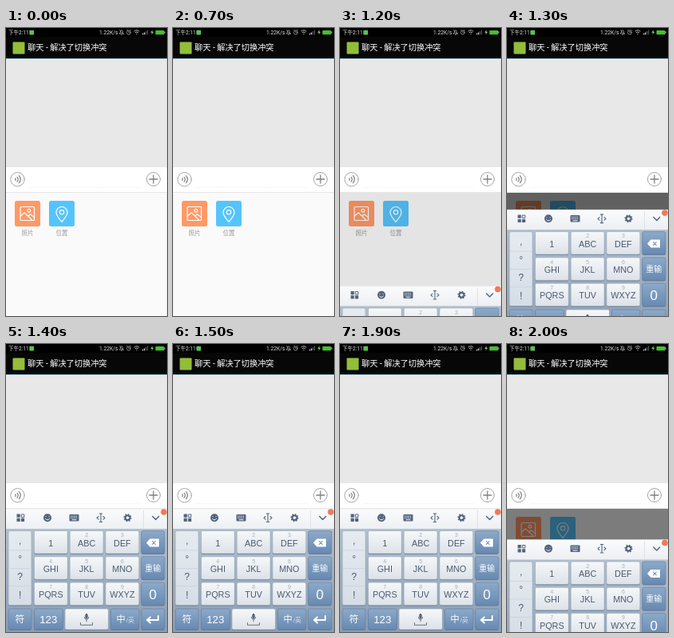
These frames come from a looping animation (202 px wide and 360 px high, 2100 ms). An HTML page:

```html
<!DOCTYPE html>
<html lang="zh">
<head>
<meta charset="utf-8">
<title>Chat keyboard switch</title>
<style>
html, body { margin: 0; width: 100%; height: 100%; overflow: hidden; background: #000; }
svg { display: block; width: 100%; height: 100%; }
text { font-family: "Liberation Sans", "Noto Sans CJK SC", "Noto Sans CJK", sans-serif; }
.bar { font-family: Roboto, "Noto Sans CJK SC", "Noto Sans CJK", sans-serif; }
.mid { text-anchor: middle; }
.line { fill: none; stroke-linecap: round; stroke-linejoin: round; }
</style>
</head>
<body>
<svg viewBox="0 0 202 360">
  <defs>
    <linearGradient id="light" x2="0" y2="1"><stop stop-color="#f6f8f9"/><stop offset="1" stop-color="#dce2e9"/></linearGradient>
    <linearGradient id="side" x2="0" y2="1"><stop stop-color="#e6ebf0"/><stop offset="1" stop-color="#d5dde6"/></linearGradient>
    <linearGradient id="blue" x2="0" y2="1"><stop stop-color="#8caac9"/><stop offset="1" stop-color="#6789b1"/></linearGradient>
    <linearGradient id="board" x2="0" y2="1"><stop stop-color="#b3c0ce"/><stop offset="1" stop-color="#8b9db4"/></linearGradient>
    <linearGradient id="tools" x2="0" y2="1"><stop stop-color="#fafbfc"/><stop offset="1" stop-color="#eceff3"/></linearGradient>
  </defs>

  <rect width="202" height="360" fill="#fafafa"/>
  <rect width="202" height="38" fill="#000"/>
  <rect y="11" width="202" height="27" fill="#070707"/>
  <rect y="38" width="202" height="136" fill="#e8e8e8"/>
  <rect y="38" width="202" height="1" fill="#a5d3e2"/>

  <!-- status bar -->
  <g fill="#ddd">
    <text class="bar" x="3" y="8" font-size="6.5">下午2:11</text>
    <text class="bar" x="117" y="8" font-size="6.7">1.22K/s</text>
    <rect x="29.3" y="2.8" width="5.8" height="5.8" rx="1" fill="#5cbf55"/>
    <g class="line" stroke="#bbb" stroke-width=".7">
      <path d="M142.500 7h5l-.9-1.400V4.500a1.600 1.600 0 0 0-3.200 0v1.100zM144.400 8.200h1.200M142.500 2.500l5 5.600"/>
      <circle cx="154" cy="5.600" r="2.500"/>
      <path d="M154 4.200v1.500h1M151.500 3l1-1M156.500 3l-1-1"/>
      <path d="M161 4a4.400 4.400 0 0 1 6 0M162.200 5.600a2.700 2.700 0 0 1 3.600 0M163.800 7.500h.4" stroke-width="1"/>
    </g>
    <path d="M171 8.300v-1.500h1.200v1.500zM173 8.300V5.400h1.200v2.900z"/>
    <path d="M175 8.300V4h1.200v4.300zM177 8.300V2.500h1.200v5.800z" fill="#555"/>
    <path d="M184 2.300l-2.800 3.500h2l-.8 2.700 3-3.700h-2z" fill="#8fd07c"/>
    <rect x="187.500" y="3" width="11" height="5.200" rx=".8" fill="#47bd35"/>
    <path d="M198.500 4.600h1v2h-1z"/>
  </g>

  <!-- title bar -->
  <rect x="8.500" y="17.500" width="15" height="15" rx="1" fill="#94bd3a"/>
  <text class="bar" x="27" y="28.300" font-size="10.200" fill="#fff">聊天 - 解决了切换冲突</text>

  <!-- input bar -->
  <rect y="174" width="202" height="31" fill="#fff"/>
  <path d="M0 205.500H202" stroke="#e6e6e6"/>
  <path d="M29 199.500H169" stroke="#ececec" stroke-width=".8" stroke-dasharray="1 1"/>
  <g class="line" stroke="#808080">
    <circle cx="14.500" cy="189.200" r="8.700" stroke="#a5a5a5"/>
    <path d="M11.700 188q1 1.200 0 2.400M14 186.400q2.400 2.800 0 5.600M16.300 184.700q4 4.500 0 9" stroke-width="1.200"/>
    <circle cx="185" cy="189" r="8.500" stroke="#a5a5a5"/>
    <path d="M180 189h10M185 184v10" stroke-width="1.300"/>
  </g>

  <!-- attachment panel -->
  <rect x="11" y="216" width="32" height="32" rx="2.500" fill="#ff9966"/>
  <rect x="54" y="216" width="32" height="32" rx="2.500" fill="#55c4fc"/>
  <g class="line" stroke="#fff" stroke-width="1.200">
    <rect x="18" y="223.500" width="17.500" height="17" rx="1"/>
    <circle cx="28.800" cy="228.300" r="1.900"/>
    <path d="M18.500 235l4.500-4.200 9.500 9M27.500 235l3-2.200 4.800 3.800"/>
    <path d="M70 242.500c-3-4.500-7-7.500-7-12a7 7 0 0 1 14 0c0 4.500-4 7.500-7 12z"/>
    <circle cx="70" cy="230.300" r="2.700"/>
  </g>
  <g class="mid" font-size="7.600" fill="#999">
    <text x="27" y="258.600">照片</text>
    <text x="70" y="258.600">位置</text>
  </g>

  <rect id="dim" y="206" width="202" height="154"/>

  <g id="keyboard">
    <rect y="206" width="202" height="26" fill="url(#tools)"/>
    <path d="M0 206.200H202" stroke="#dfe3e8" stroke-width=".5"/>
    <rect y="231" width="202" height="129" fill="url(#board)"/>
    <path d="M172.500 208V230" stroke="#d3d9e1" stroke-width=".7"/>
    <g fill="#52647d">
      <path d="M13.500 212.500h4.200v4.200h-4.200zM13.500 217.800h4.200v4.200h-4.200zM18.900 217.800h4.200v4.200h-4.200z"/>
      <path d="M19.200 213h3.600v3.400h-3.600z" fill="none" stroke="#52647d"/>
      <circle cx="52" cy="217.200" r="5"/>
      <rect x="79.500" y="213" width="12" height="8.500" rx="1"/>
      <circle cx="152.500" cy="217.200" r="4"/>
    </g>
    <g class="line" stroke="#52647d" stroke-width="1.100">
      <circle cx="152.500" cy="217.200" r="4.200" stroke-width="1.800" stroke-dasharray="1.400 1.900" stroke-linecap="butt"/>
      <path d="M119 212v10.500M117.300 212h3.400M117.300 222.500h3.400M116 215.500l-2 1.800 2 1.800M122 215.500l2 1.800-2 1.800"/>
      <path d="M183.800 215.500l4 4 4-4" stroke-width="1.400"/>
    </g>
    <g class="line" stroke="#f5f7fa" stroke-width="1">
      <path d="M50 215.800h.1M54 215.800h.1M49.500 218.500q2.500 3 5 0"/>
      <path d="M81.500 215.200h8.500M81.500 217.300h8.500" stroke-dasharray=".5 1.700"/>
      <path d="M83 219.700h5"/>
      <circle cx="152.500" cy="217.200" r="1.400" fill="#f5f7fa"/>
    </g>
    <circle cx="198" cy="210" r="3.800" fill="#f0795a"/>
    <g id="keys"></g>
    <g class="line" stroke="#55657b" stroke-width=".9">
      <rect x="99.800" y="337.500" width="2.400" height="5.500" rx="1.200" fill="#55657b"/>
      <path d="M98.300 341.500a2.700 2.700 0 0 0 5.400 0M101 344.500v2.300M93.500 348.500v2.800h15v-2.800"/>
    </g>
    <path d="M176 248.500l4.500-5h11.500v10h-11.500z" fill="#fff"/>
    <path class="line" d="M183.500 246.600l3.800 3.800M187.300 246.600l-3.800 3.800" stroke="#7896ba" stroke-width="1.200"/>
    <path class="line" d="M191 340v5h-13M181 341.500l-4 3.500 4 3.500" stroke="#fff" stroke-width="2"/>
  </g>
</svg>
<script>
const NS = "http://www.w3.org/2000/svg";
const LOOP = 2100, STEP = 100, HEIGHT = 154;
const INK = "#4a596e";
const keys = document.getElementById("keys");
const keyboard = document.getElementById("keyboard");
const dim = document.getElementById("dim");

function add(tag, attrs, content = "") {
  const el = document.createElementNS(NS, tag);
  for (const name in attrs) el.setAttribute(name, attrs[name]);
  el.textContent = content;
  keys.append(el);
}

function label(x, y, size, fill, content) {
  add("text", { x, y, "font-size": size, fill, class: "mid" }, content);
}

function key(x, y, w, h, style = "light") {
  add("rect", { x, y: y + 1, width: w, height: h, rx: 2, fill: "#6c7f98" });
  add("rect", {
    x, y, width: w, height: h, rx: 2, fill: `url(#${style})`,
    stroke: style === "blue" ? "#5f7b9f" : "#93a3b6", "stroke-width": 0.6
  });
}

// Punctuation column
key(3, 233.5, 29, 93, "side");
[",", "°", "?", "!"].forEach((mark, i) => {
  const y = 250.3 + i * 22.4;
  label(17.7, y, 12, INK, mark);
  if (i) add("rect", { x: 3.5, y: y - 15, width: 28, height: 0.6, fill: "#c3ccd7" });
});

["1", "ABC", "DEF", "GHI", "JKL", "MNO", "PQRS", "TUV", "WXYZ"].forEach((name, i) => {
  const col = i % 3, row = Math.floor(i / 3);
  const x = 35.3 + col * 44.8, y = 233.5 + row * 32.3, mid = x + 21;
  key(x, y, 42, 28.5);
  if (i) label(mid, y + 7.7, 7, "#a5afbc", i + 1);
  label(mid, y + 19, 10.8, INK, name);
});

[0, 1, 2].forEach(row => key(169.8, 233.5 + row * 32.3, 29.2, 28.5, "blue"));
label(184.2, 283.5, 10, "#fff", "重输");
label(184.2, 319, 17, "#fff", "0");

// Bottom row
[[3, 29], [35.3, 36], [131.3, 35.7], [169.8, 29.2]].forEach(([x, w]) => key(x, 331, w, 26, "blue"));
key(74, 331, 54.5, 26);
label(17.3, 348.3, 11.8, "#fff", "符");
label(53.3, 348.7, 13.2, "#fff", "123");
label(144.2, 348.2, 11.2, "#fff", "中");
label(155.8, 347.8, 8, "#d5deeb", "/英");

const unit = v => Math.min(1, Math.max(0, v));

// How far the keyboard is up: eases out on entry, eases in on exit.
function openness(t) {
  const enter = unit((t - 1174) / 200), leave = unit((t - 1900) / 200);
  return 1 - (1 - enter) ** 2 - leave ** 2;
}

function draw(time) {
  const t = Math.floor((time % LOOP) / STEP) * STEP;
  const p = openness(t);
  keyboard.setAttribute("transform", `translate(0 ${(HEIGHT * (1 - p)).toFixed(2)})`);
  keyboard.setAttribute("visibility", p > 0 ? "visible" : "hidden");
  dim.setAttribute("opacity", (0.77 * p ** 1.5).toFixed(3));
}

const start = performance.now();
function tick() {
  draw(performance.now() - start);
  requestAnimationFrame(tick);
}
tick();
</script>
</body>
</html>
```
